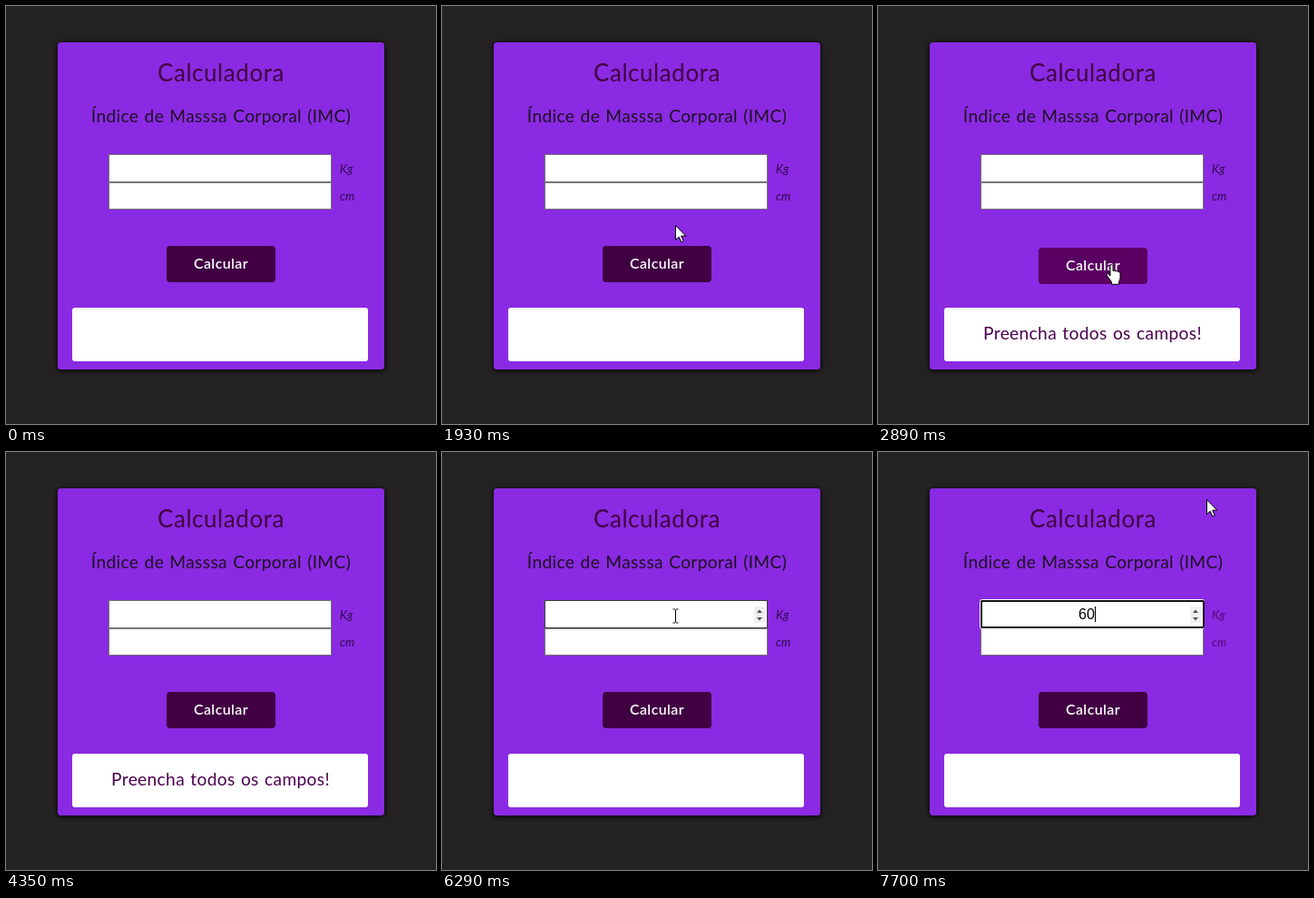
These frames come from a looping animation (474x460 px, 8000 ms). An HTML page:

```html
<!DOCTYPE html>
<html lang="pt">
<head>
<meta charset="utf-8">
<title>Calculadora</title>
<style>
html, body { margin: 0; width: 100%; height: 100%; overflow: hidden; background: #242222; }
svg { display: block; width: 474px; height: 460px; font-family: Lato, "Open Sans", sans-serif; }
.mid { text-anchor: middle; }
.line { font-size: 19.2px; letter-spacing: .34px; word-spacing: 1px; }
.field { fill: #fff; stroke: #767676; }
.unit { font-size: 13px; font-style: italic; fill: #330a4d; }
.focused .unit { font-weight: 700; fill: #650f92; }
.focused #kg { stroke: none; }
#beam { mix-blend-mode: difference; }
</style>
</head>
<body>
<svg id="stage" viewBox="0 0 474 460">
  <defs>
    <filter id="shadow" x="-10%" y="-10%" width="120%" height="120%">
      <feDropShadow dx="0" dy="1" stdDeviation="3" flood-color="#000"/>
    </filter>
  </defs>
  <rect width="474" height="460" fill="#242222"/>
  <rect x="57" y="40" width="360" height="360" rx="4" fill="#8a2be2" filter="url(#shadow)"/>
  <text class="mid" x="237" y="83" font-size="26" letter-spacing=".55" fill="#400040">Calculadora</text>
  <text class="mid line" x="237" y="128" fill="#1f1023">Índice de Masssa Corporal (IMC)</text>

  <rect id="cm" class="field" x="113.5" y="194.5" width="245" height="29"/>
  <rect id="kg" class="field" x="113.5" y="163.5" width="245" height="30"/>
  <g id="ring" fill="none">
    <rect x="112.5" y="162.5" width="247" height="32" rx="2" stroke="#fff"/>
    <rect x="114" y="164" width="245" height="29" rx="1" stroke="#101010" stroke-width="2"/>
  </g>
  <g id="spin">
    <rect x="344" y="170" width="12" height="18" fill="#efefef"/>
    <path d="M347 177l3-3.5 3 3.5zM347 182l3 3.5 3-3.5z" fill="#505050"/>
  </g>
  <text id="value" class="mid" x="230" y="184" font-size="16" font-family="'Liberation Sans', Arial, sans-serif"></text>
  <rect id="caret" y="170" width="1" height="17"/>
  <text class="unit" x="368" y="184">Kg</text>
  <text class="unit" x="368" y="214">cm</text>

  <g id="button">
    <rect id="face" x="177" y="264" width="120" height="40" rx="4"/>
    <text class="mid" x="237" y="289" font-size="16" font-weight="600" letter-spacing=".4" fill="#fff">Calcular</text>
  </g>

  <rect x="73" y="332" width="326" height="59" rx="3" fill="#fff"/>
  <text id="message" class="mid line" x="236.5" y="367" fill="#4b0050">Preencha todos os campos!</text>

  <path id="arrow" d="M.5.5v16l3.7-3.4 2.6 5.6 2.4-1.1-2.5-5.5h5z" fill="#fff" stroke="#000"/>
  <path id="hand" d="M0 1.5q1.5-2 3 0v6q1.3-1.2 2.7.3 1.5-1 2.6.5 2.6-.5 2.7 2v5q0 2-1.5 4v3h-8v-2.5l-5-7q-1-2.3 1-2.3l2.5 2.3z" fill="#fff" stroke="#000"/>
  <path id="beam" d="M-3-7.5h2.5m1 0h2.5M0-7v14M-3 7.5h2.5m1 0h2.5" fill="none" stroke="#fff"/>
</svg>
<script>
const LOOP = 8000;
const $ = id => document.getElementById(id);
const show = (id, on) => $(id).style.display = on ? '' : 'none';
const clamp = v => Math.max(0, Math.min(1, v));
const mix = (a, b, k) => a + (b - a) * k;

// Each move: start, step length, then points [step, x, y]
const moves = [
  { at: 660, dt: 68, path: [[0, 292, 369], [4, 283, 224], [5, 266, 189]] },
  { at: 1400, dt: 68, path: [[0, 265, 189]] },
  { at: 1670, dt: 65, path: [[0, 264, 192], [4, 257, 241], [7, 257, 262], [9, 256, 284]] },
  { at: 4150, dt: 66, path: [[0, 150, 303], [2, 2, 335], [3, -40, 345]] },
  { at: 5810, dt: 68, path: [[0, 281, 260], [3, 318, 223], [7, 257, 180]] },
  { at: 6690, dt: 70, path: [[0, 270, 172], [3, 358, 118], [4, 362, 52]] }
];

function pointer(t) {
  const move = moves.filter(m => m.at <= t).pop();
  if (!move) return [-40, 0];
  const { at, dt, path } = move;
  const step = Math.floor((t - at) / dt);
  const next = path.findIndex(p => p[0] > step);
  if (next < 0) return path[path.length - 1].slice(1);
  const a = path[next - 1], b = path[next];
  const k = (step - a[0]) / (b[0] - a[0]);
  return [1, 2].map(i => Math.round(mix(a[i], b[i], k)));
}

function draw(now) {
  const t = now % LOOP;
  const [x, y] = pointer(t);
  const over = (l, top, r, b) => x >= l && x < r && y >= top && y < b;
  const onKg = over(113, 163, 359, 194);
  const onCm = over(113, 194, 359, 225);
  const onButton = over(177, 264, 297, 306);
  const onText = over(96, 110, 378, 134);

  const shape = onButton ? 'hand' : onKg || onCm || onText ? 'beam' : 'arrow';
  for (const id of ['arrow', 'hand', 'beam']) show(id, id === shape);
  const nudge = shape === 'beam' ? .5 : 0;
  $(shape).setAttribute('transform', `translate(${x + nudge} ${y + nudge})`);

  const focus = t >= 6430;
  $('stage').classList.toggle('focused', focus);
  show('ring', focus);
  show('spin', focus || onKg);
  $('kg').style.stroke = focus ? 'none' : onKg ? '#404040' : '';
  $('cm').style.stroke = onCm ? '#404040' : '';

  const typed = '60'.slice(0, (t >= 7390) + (t >= 7700));
  $('value').textContent = typed;
  show('caret', focus && (t < 6970 || t >= 7390));
  $('caret').setAttribute('x', Math.round(230 + typed.length * 4.45));

  const hover = clamp((t - 2190) / 200) * (1 - clamp((t - 4150) / 200));
  $('button').setAttribute('transform', `translate(0 ${2 * hover})`);
  $('face').setAttribute('fill', `rgb(${mix(64, 90, hover)} 0 ${mix(66, 98, hover)})`);
  show('message', t >= 2890 && t < 5500);

  requestAnimationFrame(draw);
}
requestAnimationFrame(draw);
</script>
</body>
</html>
```
